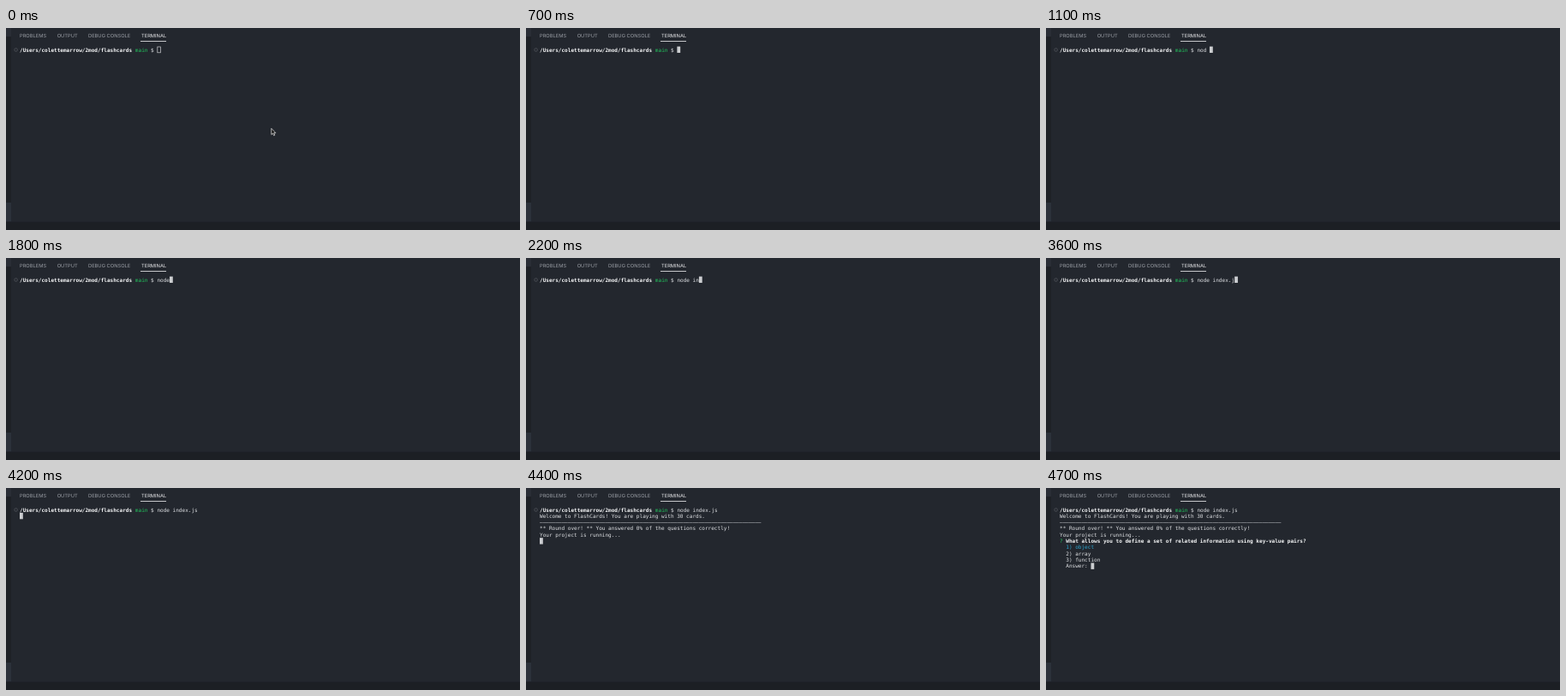
An HTML page for the animation above (5 s loop, 600 px wide and 236 px high).

```html
<!DOCTYPE html>
<html lang="en">
<head>
<meta charset="utf-8">
<title>Flashcards in the terminal</title>
<style>
  html, body { margin: 0; width: 100%; height: 100%; overflow: hidden; background: #23272e; }
  svg { display: block; width: 600px; height: 236px; }
  text { white-space: pre; text-rendering: geometricPrecision; }
  .tab { font: 5.75px Inter, "Liberation Sans", sans-serif; fill: #9b9fa6; }
  .active { fill: #e8e9eb; }
  .mono { font: 6.055px "DejaVu Sans Mono", "Liberation Mono", monospace; fill: #dfe1e4; }
  .bold { font-weight: bold; fill: #f4f5f6; }
  .green { fill: #23c55e; }
  .cyan { fill: #2ba5cf; }
</style>
</head>
<body>
<svg id="stage" viewBox="0 0 600 236">
  <rect width="600" height="236" fill="#23272e"/>
  <rect width="6" height="226" fill="#1e2126"/>
  <rect width="6" height="10" fill="#2a2e36"/>
  <rect y="204" width="6" height="22" fill="#2c313a"/>
  <rect y="226.5" width="600" height="9.5" fill="#1c1f24"/>
  <text class="tab" x="16" y="11">PROBLEMS</text>
  <text class="tab" x="59.7" y="11">OUTPUT</text>
  <text class="tab" x="96" y="11">DEBUG CONSOLE</text>
  <text class="tab active" x="158" y="11">TERMINAL</text>
  <rect x="157" y="15" width="30" height="0.9" fill="#d9dadc"/>
  <circle cx="11.6" cy="25.5" r="1.8" fill="none" stroke="#565a61" stroke-width="0.7"/>
  <g id="prompt"></g>
  <g id="result"></g>
  <g id="quiz"></g>
  <rect id="caret" width="3.8" height="7.4"/>
  <path id="mouse" d="M0 0V7.2L1.7 5.7L2.8 8.3L4 7.8L2.9 5.3H5Z"
        fill="#111" stroke="#f2f2f2" stroke-width="0.7" stroke-linejoin="round"/>
</svg>
<script>
const LOOP = 5000, LEFT = 16, CELL = 3.645, ROW = 7.32, BASE = 27.5;
const INPUT_COL = 44;
const $ = id => document.getElementById(id);

function write(group, row, col, str, style = "") {
  const el = document.createElementNS("http://www.w3.org/2000/svg", "text");
  el.setAttribute("class", "mono " + style);
  el.setAttribute("x", LEFT + col * CELL);
  el.setAttribute("y", BASE + row * ROW);
  el.textContent = str;
  $(group).append(el);
  return el;
}

write("prompt", 0, 0, "/Users/colettemarrow/2mod/flashcards", "bold");
write("prompt", 0, 37, "main", "green");
write("prompt", 0, 42, "$");
const command = write("prompt", 0, INPUT_COL, "");

write("result", 1, 0, "Welcome to FlashCards! You are playing with 30 cards.");
write("result", 2, 0, "–".repeat(71));
write("result", 3, 0, "** Round over! ** You answered 0% of the questions correctly!");
write("result", 4, 0, "Your project is running...");

write("quiz", 5, 0, "?", "green");
write("quiz", 5, 2, "What allows you to define a set of related information using key-value pairs?", "bold");
write("quiz", 6, 2, "1) object", "cyan");
write("quiz", 7, 2, "2) array");
write("quiz", 8, 2, "3) function");
write("quiz", 9, 2, "Answer:");

// [time, typed text]; includes one corrected slip
const typing = [
  [0, ""], [800, "n"], [900, "no"], [1000, "nod"], [1100, "nod "], [1600, "nod"],
  [1800, "node"], [1900, "node "], [2000, "node i"], [2200, "node in"],
  [2700, "node ind"], [2800, "node inde"], [3100, "node index"],
  [3400, "node index."], [3600, "node index.j"], [3700, "node index.js"]
];
// [time, row, column] of the caret once the command runs
const jumps = [[4000, 1, 0], [4400, 5, 0], [4500, 9, 10]];

const latest = (steps, t) => steps.filter(s => s[0] <= t).pop();
const show = (id, on) => $(id).setAttribute("visibility", on ? "visible" : "hidden");

function draw(t) {
  const typed = latest(typing, t)[1];
  command.textContent = typed;
  show("result", t >= 4400);
  show("quiz", t >= 4500);

  const [, row, col] = latest(jumps, t) || [0, 0, INPUT_COL + typed.length];
  const hollow = t < 100, inset = hollow ? 0.4 : 0;
  const caret = $("caret");
  caret.setAttribute("x", LEFT + col * CELL + inset);
  caret.setAttribute("y", 21.6 + row * ROW + inset);
  caret.setAttribute("height", hollow ? 6.8 : 7.4);
  caret.setAttribute("fill", hollow ? "none" : "#cbcdd0");
  caret.setAttribute("stroke", hollow ? "#cbcdd0" : "none");
  caret.setAttribute("stroke-width", 0.7);

  show("mouse", t < 700);
  $("mouse").setAttribute("transform", t < 100 ? "translate(309.8 117.3)" : "translate(307.8 114.3)");
}

const start = performance.now();
function tick() {
  draw((performance.now() - start) % LOOP);
  requestAnimationFrame(tick);
}
tick();
</script>
</body>
</html>
```
